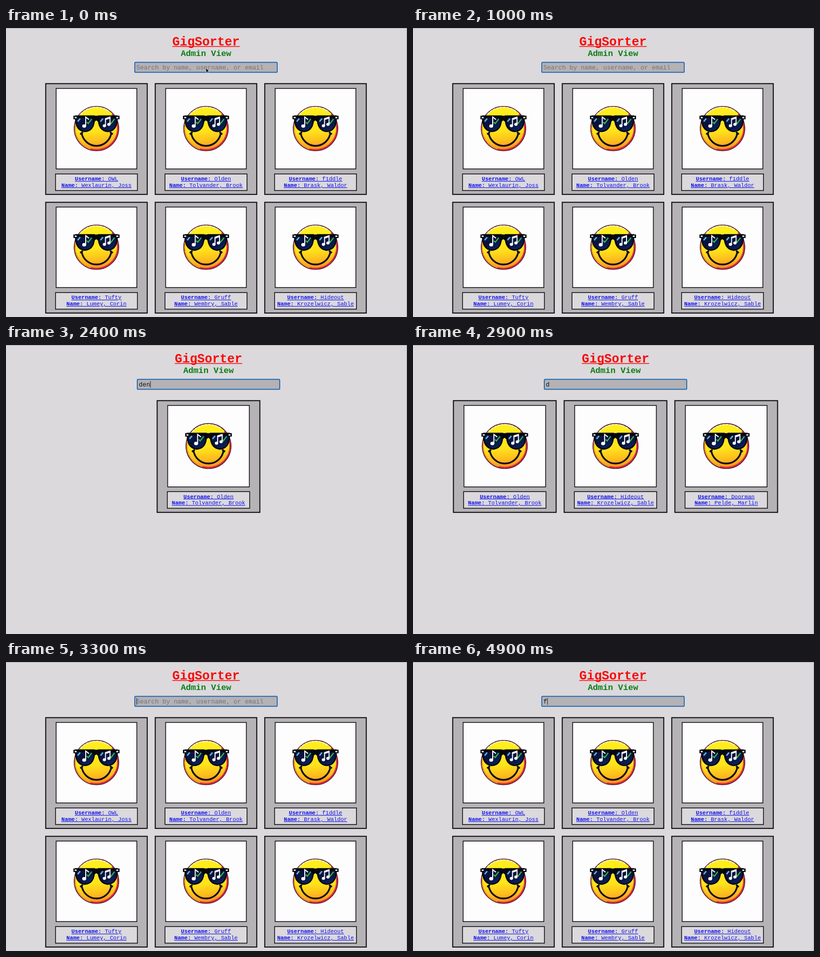
Recreate the animation shown at these times as an HTML page. Size 800x578 px, loop 5 s.

```html
<!DOCTYPE html>
<html lang="en">
<head>
<meta charset="utf-8">
<title>Admin View</title>
<style>
  html, body { margin: 0; width: 100%; height: 100%; overflow: hidden; background: #dbd9dc; }
  svg { display: block; }
  text { font-family: "Liberation Mono", monospace; white-space: pre; }
  .mid { text-anchor: middle; }
  .link { font-size: 11.1px; fill: #1212ea; text-decoration: underline; }
  .b { font-weight: bold; }
</style>
</head>
<body>
<svg width="800" height="578" viewBox="0 0 800 578">
  <defs>
    <linearGradient id="skin" x1="0.45" y1="0" x2="0.55" y2="1">
      <stop offset="0" stop-color="#fff01e"/>
      <stop offset="0.55" stop-color="#ffe31a"/>
      <stop offset="0.8" stop-color="#fdba1e"/>
      <stop offset="1" stop-color="#f78a20"/>
    </linearGradient>
    <linearGradient id="glass" x1="0" y1="0" x2="0.7" y2="1">
      <stop offset="0" stop-color="#0a1c4c"/>
      <stop offset="0.55" stop-color="#08113a"/>
      <stop offset="1" stop-color="#0b2566"/>
    </linearGradient>
    <g id="lens">
      <path d="M-19-25H18V-15Q16 5-1 6Q-17 4-19-15Z" fill="url(#glass)" stroke="#05060f" stroke-width="2.5"/>
      <path d="M-15-14L-10-20" stroke="#69b9dc" stroke-width="2.6"/>
      <path d="M3-13L6-10L13-19" fill="none" stroke="#35b548" stroke-width="2.4"/>
    </g>
    <g id="face">
      <circle r="44.4" fill="url(#skin)" stroke="#4a1434" stroke-width="1.6"/>
      <path d="M31-29A42.5 42.5 0 0 1-12 40.8" fill="none" stroke="#e2283a" stroke-width="2.6"/>
      <path d="M-12 40.8A42.5 42.5 0 0 1-42-7" fill="none" stroke="#f08a24" stroke-width="2"/>
      <path d="M-36-23A42.5 42.5 0 0 1 24-35" fill="none" stroke="#fff3d2" stroke-width="2.2" stroke-dasharray="5 2"/>
      <path d="M-29.5 9A29.8 29.8 0 0 0 29.5 9M-32.5 11.5L-27 7M32.5 11.5L27 7" fill="none" stroke="#100b16" stroke-width="3.4"/>
      <use href="#lens" x="-22.5"/>
      <use href="#lens" x="23"/>
      <path d="M-46-25.5H46V-18.5H40L38-21H9L5-14H2Q0-18-3-14H-6L-9-21H-38L-40-18.5H-46Z" fill="#05060f"/>
      <path d="M-43.5-22H-39.5M39.5-22H43.5" stroke="#e8e8ec" stroke-width="2.8"/>
      <g fill="#fafafa" stroke="#fafafa" stroke-width="2">
        <path d="M-21.5-5V-23L-15-18" fill="none"/>
        <ellipse cx="-24.5" cy="-5" rx="3" ry="2.4"/>
        <path d="M18-6V-20L27-23V-9M18-18L27-21" fill="none"/>
        <ellipse cx="15.8" cy="-5.6" rx="2.3" ry="2"/>
        <ellipse cx="24.8" cy="-8.4" rx="2.3" ry="2"/>
      </g>
    </g>
  </defs>
  <rect width="800" height="578" fill="#dbd9dc"/>
  <g id="page"></g>
  <path d="M0 .5H800M799.5 0V578" stroke="#aaa8ac" fill="none"/>
</svg>
<script>
const LOOP = 5000, STEP = 100;
const page = document.getElementById('page');

const people = [
  ['OWL', 'Wexlaurin, Joss'],
  ['Olden', 'Tolvander, Brook'],
  ['f1ddle', 'Brask, Waldor'],
  ['Tufty', 'Lumey, Corin'],
  ['Gruff', 'Wembry, Sable'],
  ['Hideout', 'Krozelwicz, Sable'],
  ['Doorman', 'Pelde, Marlin']
];

const typing = [[0, ''], [1300, 'd'], [1400, 'de'], [1600, 'den'],
                [2600, 'de'], [2800, 'd'], [3000, ''], [4800, 'f']];
// The results lag behind the typing.
const queries = [[0, ''], [1800, 'den'], [2800, 'de'], [3000, 'd'], [3200, '']];

const at = (track, t) => track.filter(k => k[0] <= t).pop()[1];

function box(x, y, w, h, line, fill, stroke = '#0c0b0e', r = 0) {
  return `<rect x="${x + line / 2}" y="${y + line / 2}" width="${w - line}" height="${h - line}"
    rx="${r}" fill="${fill}" stroke="${stroke}" stroke-width="${line}"/>`;
}

function link(cx, y, label, value) {
  return `<text class="link mid" x="${cx}" y="${y}"><tspan class="b">${label}:</tspan> ${value}</text>`;
}

// "grow" is the extra card size gained when there is no scrollbar.
function card([user, name], cx, y, grow) {
  const w = 204.5 + grow, photo = 162.5 + grow * 0.8, plate = 165 + grow * 0.4;
  const low = y + grow * 0.6;
  return box(cx - w / 2, y, w, 223.5 + grow * 0.8, 2, '#b5b3b6') +
    box(cx - photo / 2, y + 9.8, photo, photo, 1.5, '#fefdfe') +
    `<use href="#face" transform="translate(${cx} ${y + 90.8 + grow * 0.4}) scale(${photo / 162.5})"/>` +
    box(cx - plate / 2, low + 180.8, plate, 34.7, 1.5, '#dbd9dc') +
    link(cx, low + 194.8, 'Username', user) +
    link(cx, low + 207.6, 'Name', name);
}

function results(query) {
  return people.filter(p => p.join(' ').toLowerCase().includes(query));
}

function cards(found, mid, grow) {
  const pitch = 218.5 + grow;
  return found.map((p, i) => {
    const row = Math.floor(i / 3), count = Math.min(3, found.length - row * 3);
    const cx = mid + (i % 3 - (count - 1) / 2) * pitch;
    return card(p, cx, 110.3 + row * (237.3 + grow * 0.8), grow);
  }).join('');
}

function search(x, typed, caret) {
  const cx = x + 4.8 + typed.length * 7.47;
  return box(x, 67.7, 286, 21.8, 1.7, '#b4b2b5', '#1660b4', 2) +
    `<text x="${x + 4}" y="82.5" font-size="12.45" fill="${typed ? '#151418' : '#757378'}">` +
    (typed || 'Search by name, username, or email') + '</text>' +
    (caret ? `<path d="M${cx} 72V85.5" stroke="#222"/>` : '');
}

function draw(t) {
  const typed = at(typing, t);
  const found = results(at(queries, t));
  const scrolls = found.length > 6;
  const mid = scrolls ? 399 : 404, grow = scrolls ? 0 : 2.4;
  const caret = t >= 4800 || [1, 4, 6, 8].includes(Math.floor(t / 500));
  const pointer = t < 500
    ? '<path d="M399 80V89L401 87.2L402.5 90L404 89.2L402.7 86.5H405.2Z" fill="#0a0a0a" stroke="#eee" stroke-width=".6"/>'
    : '';
  page.innerHTML =
    `<text class="b mid" x="${mid}" y="35" font-size="24.9" fill="#f80a0a">GigSorter</text>
     <path d="M${mid - 67.2} 37H${mid + 67.2}" stroke="#f80a0a" stroke-width="1.7"/>
     <text class="b mid" x="${mid}" y="56" font-size="16.8" fill="#0b7d16">Admin View</text>` +
    search(mid - 143, typed, caret) + cards(found, mid, grow) + pointer;
}

let last = -1;
function tick() {
  const t = Math.floor(performance.now() % LOOP / STEP) * STEP;
  if (t !== last) draw(last = t);
  requestAnimationFrame(tick);
}
tick();
</script>
</body>
</html>
```
